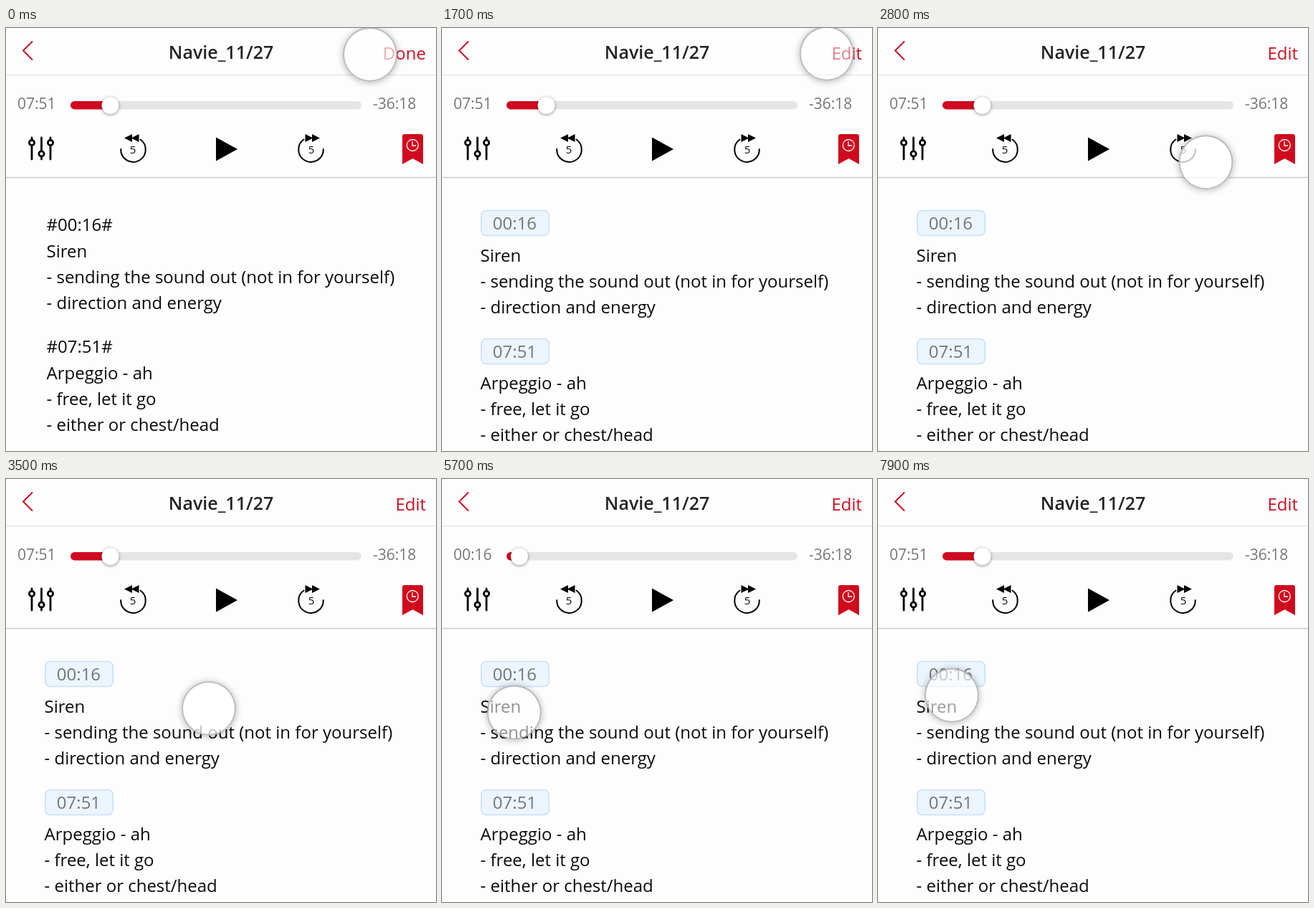
An HTML page for the animation above (8000 ms loop, 600 by 590 pixels).

```html
<!DOCTYPE html>
<html lang="en">
<head>
<meta charset="utf-8">
<title>Audio notes</title>
<style>
html, body { margin: 0; width: 100%; height: 100%; overflow: hidden; background: #fefdfe; }
svg { display: block; width: 600px; height: 590px; }
text { font: 24px "Open Sans", "Noto Sans", sans-serif; fill: #0a0a0a; white-space: pre; }
.title { font-size: 25px; font-weight: 600; fill: #242424; text-anchor: middle; }
.action { fill: #cc1022; text-anchor: end; }
.time { font-size: 21px; fill: #777; }
.stamp { fill: #747678; }
.five { font-size: 15px; text-anchor: middle; }
.line { fill: none; stroke: #000; stroke-width: 2; stroke-linecap: round; }
.chip { fill: #ecf4fd; stroke: #c6e0f8; stroke-width: 1.5; }
#knob { fill: #fff; filter: drop-shadow(0 1px 2px rgba(0,0,0,.45)); }
#touch {
  position: absolute; left: 0; top: 0; width: 76px; height: 76px;
  box-sizing: border-box; border: 2px solid rgba(165,165,165,.75); border-radius: 50%;
  box-shadow: 0 1px 8px 1px rgba(0,0,0,.24);
}
</style>
</head>
<body>
<svg viewBox="0 0 600 590">
  <path d="M37 18.5 24 31.5 37 44.5" fill="none" stroke="#cc1022" stroke-width="2"/>
  <text class="title" x="300" y="43">Navie_11/27</text>
  <text class="action" id="action" x="586" y="43.5"></text>
  <path d="M0 65.5H600" stroke="#dedede"/>
  <path d="M0 208.5H600" stroke="#c9c9c9" stroke-width="1.5"/>

  <text class="time" id="elapsed" x="16" y="113"></text>
  <text class="time" x="512" y="113">-36:18</text>
  <rect x="90" y="102" width="406" height="11.5" rx="5.7" fill="#e6e5e6"/>
  <rect id="played" x="90" y="102" height="11.5" rx="5.7" fill="#d00a1e"/>
  <circle id="knob" cy="108" r="12"/>

  <g class="line" style="stroke-width:2.8">
    <path d="M36 153V156M36 164V183M49.500 153V171M49.500 179V183M62 153V156M62 164V183"/>
    <circle cx="36" cy="160" r="3.6"/>
    <circle cx="49.500" cy="175.500" r="3.6"/>
    <circle cx="62" cy="160" r="3.6"/>
  </g>

  <g id="back">
    <path class="line" d="M187.500 155.500A17.300 17.300 0 1 1 160.200 169"/>
    <path d="M165 153.500 176 148V159ZM174.500 153.500 185.500 148V159Z"/>
  </g>
  <use href="#back" transform="matrix(-1 0 0 1 603 0)"/>
  <text class="five" x="177" y="175">5</text>
  <text class="five" x="426" y="175">5</text>
  <path d="M293 152.500 323 169 293 185.500Z"/>

  <path d="M556 148H579Q582 148 582 151V190L567.500 182 553 190V151Q553 148 556 148Z" fill="#d00a1e"/>
  <g fill="none" stroke="#fff" stroke-width="1.3">
    <circle cx="567.300" cy="163.500" r="8"/>
    <path d="M567 158V164H572"/>
  </g>

  <g id="edit"></g>
  <g id="view"></g>
</svg>
<div id="touch"></div>
<script>
const $ = id => document.getElementById(id);
const LOOP = 8000, STEP = 100;
const SAVED = 1500, SEEK_START = 5300, SEEK_BACK = 7000;

const notes = [
  { at: "00:16", y: 282.5, lines: ["Siren", "- sending the sound out (not in for yourself)", "- direction and energy"] },
  { at: "07:51", y: 452.5, lines: ["Arpeggio - ah", "- free, let it go", "- either or chest/head"] }
];

const label = (x, y, s, cls = "") => `<text class="${cls}" x="${x}" y="${y}">${s}</text>`;
const block = (x, y, lines) => lines.map((s, i) => label(x, y + i * 36, s)).join("");

$("edit").innerHTML = notes.map(n =>
  label(56.5, n.y, `#${n.at}#`) + block(56.5, n.y + 37, n.lines)).join("");

$("view").innerHTML = notes.map((n, i) => {
  const top = 254.5 + i * 179;
  return `<rect class="chip" x="54.7" y="${top}" width="94.600" height="35" rx="7"/>` +
    label(70.8, top + 26.5, n.at, "stamp") +
    block(53.5, top + 71 - i, n.lines);
}).join("");

// Touch moves: start, end, then from, control and to points
const moves = [
  [0, 500, 508, 37, 522, 36, 537, 35],
  [1650, 2900, 537, 35, 523, 113, 455, 190],
  [3200, 3800, 455, 190, 287, 412, 103, 266],
  [5450, 6100, 103, 266, 98, 356, 103, 446],
  [7150, 8200, 103, 446, 103, 356, 103, 266]
];
// Touch fill strength: time, alpha
const fades = [[0, .65], [500, .42], [1650, .42], [2000, .78], [3500, .74], [3900, .45],
  [5450, .45], [5700, .55], [6100, .45], [7150, .45], [7900, .6], [8000, .6]];

const clamp = v => Math.min(1, Math.max(0, v));
const ease = v => v * v * (3 - 2 * v);

function place(t) {
  const [a, b, x0, y0, cx, cy, x1, y1] = moves.filter(m => m[0] <= t).pop();
  const k = ease(clamp((t - a) / (b - a))), j = 1 - k;
  const mix = (p, q, r) => j * j * p + 2 * j * k * q + k * k * r;
  return [mix(x0, cx, x1), mix(y0, cy, y1)];
}

function alpha(t) {
  const i = fades.findIndex(f => f[0] > t);
  const [a, p] = fades[i - 1], [b, q] = fades[i];
  return p + (q - p) * (t - a) / (b - a);
}

function draw(now) {
  const t = Math.floor(now % LOOP / STEP) * STEP;
  const saved = t >= SAVED;
  $("edit").style.display = saved ? "none" : "";
  $("view").style.display = saved ? "" : "none";
  $("action").textContent = saved ? "Edit" : "Done";

  const early = t >= SEEK_START && t < SEEK_BACK;
  const x = early ? 108 : 145.5;
  $("elapsed").textContent = notes[early ? 0 : 1].at;
  $("knob").setAttribute("cx", x);
  $("played").setAttribute("width", x - 90);

  const [px, py] = place(t);
  $("touch").style.transform = `translate(${px - 38}px, ${py - 38}px)`;
  $("touch").style.background = `rgba(255,255,255,${alpha(t)})`;
}

const began = performance.now();
function tick() {
  draw(performance.now() - began);
  requestAnimationFrame(tick);
}
tick();
</script>
</body>
</html>
```
